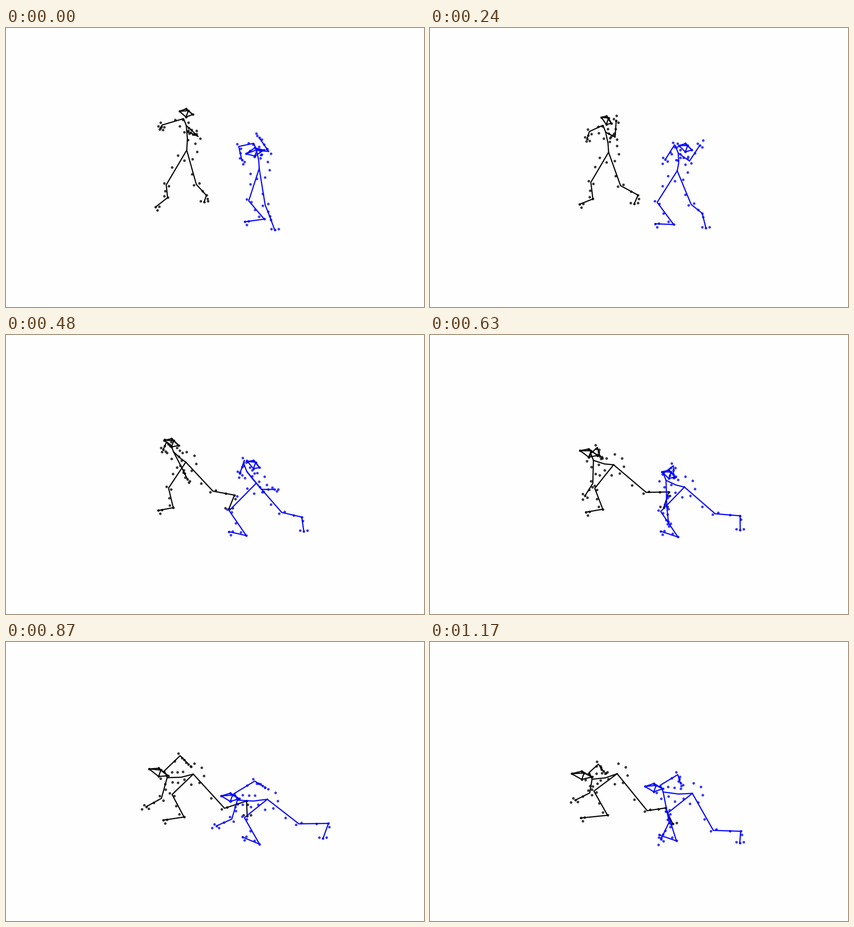
A matplotlib script for the animation above (1200 ms loop, 917 px wide and 611 px high).

```python
import numpy as np
import matplotlib.pyplot as plt
from matplotlib.animation import FuncAnimation

W, H, DPI = 917, 611, 100
FRAMES, STEP = 40, 30

LIMBS = ["pelvis spine neck sh_r el_r ha_r", "neck sh_l el_l ha_l",
         "pelvis kn_r an_r to_r", "pelvis kn_l an_l to_l",
         "brow crown nape chin brow top nape", "crown top chin"]
MARKED = "brow crown chin nape top an_r to_r an_l to_l".split()


def glide(path, u):
    """Smooth curve through evenly timed points, u from 0 to 1."""
    s = u * (len(path) - 1)
    i = min(int(s), len(path) - 2)
    s -= i
    slope = np.gradient(path, axis=0)
    return ((1 + 2 * s) * (1 - s) ** 2 * path[i] + s * s * (3 - 2 * s) * path[i + 1]
            + s * (1 - s) * ((1 - s) * slope[i] - s * slope[i + 1]))


def along(a, b, share, dx=0, dy=0):
    return a + (b - a) * share + (dx, dy)


def pair(p, dx, dy):
    return [p + (dx, dy), p - (dx, dy)]


def ring(p, count, radius, start, end):
    angles = np.radians(np.linspace(start, end, count))
    return [p + radius * np.array([np.cos(a), np.sin(a)]) for a in angles]


def markers(at):
    """Capture markers, worn at fixed spots of the body."""
    spots = [at[name] for name in MARKED]
    spots += ring(at["pelvis"], 6, 23, -85, 150)
    spots += ring(at["neck"], 4, 15, 40, 240)
    spots += [along(at["spine"], at["neck"], s, 4, -12) for s in (0, 0.4, 0.8)]
    for side in "rl":
        sh, el, ha, kn, an, to = (at[f"{j}_{side}"] for j in "sh el ha kn an to".split())
        spots += [along(sh, el, 0.5, 5, -4), *pair(el, 4, 5), *pair(ha, 5, 4)]
        spots += [along(el, ha, s) for s in (0.5, 1, 1.3)]
        if side == "r":
            spots += [along(at["pelvis"], kn, 0.6, -6, -8), *pair(kn, 5, 3),
                      along(kn, an, 0.5, -4), along(kn, an, 0.87, -7),
                      to + (8, -1), to + (4, 7)]
        else:
            spots += [along(at["pelvis"], kn, 0.57, 0, 10), *pair(kn, 6, -2),
                      along(kn, an, 0.6), an + (2, 8), to + (-8, -2), to + (8, -2)]
    return spots


class Mover:
    """A stick figure; each keyword gives the path of one joint."""

    def __init__(self, ax, color, z, **paths):
        self.paths = {k: np.reshape(xy, (-1, 2)).astype(float) for k, xy in paths.items()}
        self.dots, = ax.plot([], [], "o", color=color, ms=3.1, mew=1, alpha=0.7, zorder=z)
        self.bones, = ax.plot([], [], color=color, lw=1.9, alpha=0.95, zorder=z + 1)

    def body(self, u):
        at = {name: glide(path, u) for name, path in self.paths.items()}
        at["spine"] = along(at["pelvis"], at["neck"], 0.5, 2, 3)
        at["sh_r"] = at["neck"] + (-6, -15)
        at["sh_l"] = along(at["neck"], at["el_l"], 0.33)
        middle = along(at["brow"], at["nape"], 0.5)
        at["crown"], at["chin"] = pair(middle, 0, -9)
        at["top"] = middle + (5, -5)
        return at

    def pose(self, u):
        at = self.body(u)
        line = []
        for limb in LIMBS:
            line += [at[name] for name in limb.split()] + [(np.nan, np.nan)]
        self.bones.set_data(*np.transpose(line))
        self.dots.set_data(*np.transpose(markers(at)))


fig = plt.figure(figsize=((W + 0.01) / DPI, (H + 0.01) / DPI), dpi=DPI, facecolor="#fefefe")
ax = fig.add_axes([0, 0, 1, 1])
ax.set(xlim=(-0.5, W - 0.5), ylim=(H - 0.5, -0.5))
ax.axis("off")

dark = Mover(
    ax, "black", 1,
    pelvis=(396, 267, 391, 275, 409, 288, 410, 288),
    neck=(395, 213, 382, 232, 360, 269, 353, 297, 355, 300),
    brow=(380, 182, 372, 200, 333, 247, 313, 278, 310, 288),
    nape=(409, 189, 394, 214, 370, 257, 355, 293, 355, 295),
    el_r=(342, 212, 349, 226, 351, 233, 373, 250, 382, 249, 369, 267),
    ha_r=(338, 219, 344, 242, 343, 250, 385, 270, 401, 267, 380, 283),
    el_l=(421, 237, 406, 238, 387, 288, 346, 336, 341, 341, 350, 330),
    ha_l=(404, 229, 408, 201, 400, 311, 317, 361, 308, 357, 318, 346),
    kn_r=(351, 343, 354, 335, 364, 335, 359, 326),
    an_r=(354, 371, 361, 376, 388, 383, 389, 379),
    to_r=(327, 392, 330, 383, 346, 390, 330, 385),
    kn_l=(417, 342, 421, 345, 470, 342, 479, 364, 476, 369),
    an_l=(439, 366, 462, 364, 519, 344, 527, 348, 516, 363),
    to_l=(434, 381, 453, 385, 507, 378, 529, 381, 532, 398))

blue = Mover(
    ax, "blue", 3,
    pelvis=(555, 307, 541, 314, 555, 330, 573, 344, 575, 331),
    neck=(549, 267, 542, 277, 520, 312, 507, 346, 511, 328),
    brow=(526, 275, 546, 257, 515, 292, 471, 337, 471, 316),
    nape=(565, 267, 573, 269, 543, 304, 511, 343, 510, 321),
    el_r=(510, 259, 536, 255, 522, 273, 539, 291, 546, 306, 543, 290),
    ha_r=(517, 289, 516, 287, 512, 302, 544, 307, 565, 316, 549, 309),
    el_l=(576, 270, 569, 290, 562, 335, 503, 388, 497, 386, 524, 394),
    ha_l=(555, 240, 591, 255, 591, 333, 494, 429, 459, 394, 506, 432),
    kn_r=(532, 378, 486, 383, 520, 386, 521, 374),
    an_r=(566, 418, 523, 436, 556, 443, 540, 435),
    to_r=(523, 424, 484, 430, 519, 428, 502, 422),
    kn_l=(568, 387, 576, 386, 620, 390, 642, 398, 621, 412),
    an_l=(578, 412, 604, 404, 672, 396, 707, 397, 681, 414),
    to_l=(589, 442, 611, 436, 674, 427, 695, 430, 679, 440))


def draw(frame):
    for mover in (dark, blue):
        mover.pose(frame / (FRAMES - 1))
    return dark.dots, dark.bones, blue.dots, blue.bones


anim = FuncAnimation(fig, draw, frames=FRAMES, interval=STEP, repeat=True, repeat_delay=0)
plt.show()
```
